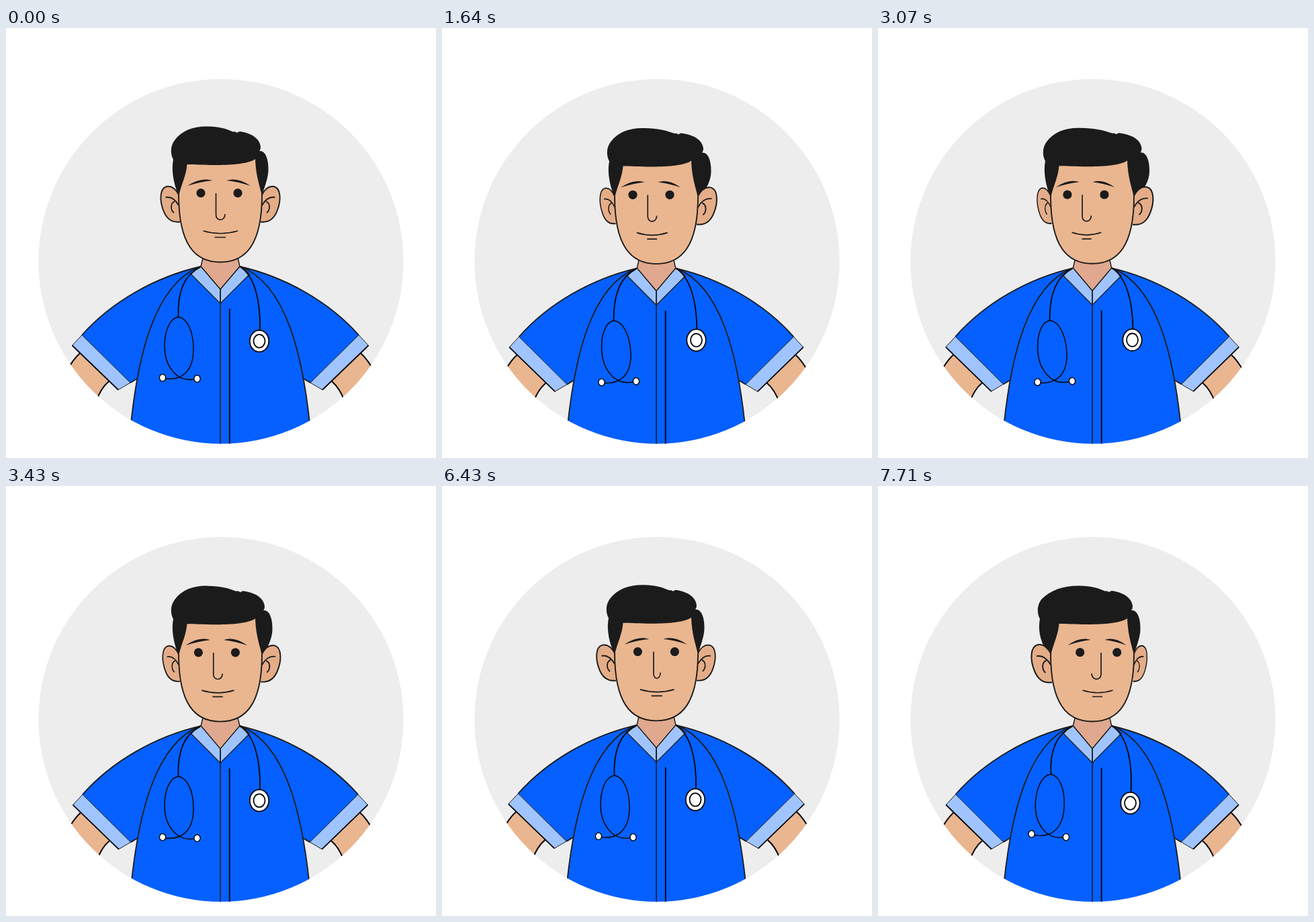
An HTML page with a canvas that plays this animation: 640x640 px, repeating every 8 s.

```html
<!DOCTYPE html>
<html lang="en">
<head>
<meta charset="utf-8">
<title>Doctor</title>
<style>
  html, body { margin: 0; width: 100%; height: 100%; overflow: hidden; background: #fff; }
  canvas { display: block; }
</style>
</head>
<body>
<canvas id="stage" width="640" height="640"></canvas>
<script>
const ctx = document.getElementById('stage').getContext('2d');
const INK = '#1b1b1b', BLACK = '#050508', BLUE = '#0560ff', PALE = '#a0c4ff';
const SKIN = '#eab690', EAR = '#e4ad88', NECK = '#e0a88e';
const LOOP = 8000, FPS = 14;
const BLINKS = [28, 62, 105], LIDS = [0.55, 0.12, 0.55];

const ramp = (k, from, to) => Math.min(1, Math.max(0, (k - from) / (to - from)));

function shape(d, fill, width, color = INK) {
  const path = new Path2D(d);
  if (fill) { ctx.fillStyle = fill; ctx.fill(path); }
  if (width) { ctx.strokeStyle = color; ctx.lineWidth = width; ctx.stroke(path); }
}

function oval(x, y, rx, ry, fill, width) {
  ctx.beginPath();
  ctx.ellipse(x, y, rx, ry, 0, 0, 7);
  ctx.fillStyle = fill;
  ctx.fill();
  if (width) { ctx.strokeStyle = BLACK; ctx.lineWidth = width; ctx.stroke(); }
}

function group(draw) {
  ctx.save();
  draw();
  ctx.restore();
}

// Draws the left half, then its mirror image about x = 319.
function bothSides(draw) {
  group(() => draw(0));
  group(() => { ctx.translate(638, 0); ctx.scale(-1, 1); draw(1); });
}

function body() {
  bothSides(() => {
    shape('M110 484 Q100 493 90 511 L110 580 L134 556 Q141 536 153 526Z', SKIN);
    shape('M110 484 Q100 493 90 511 M153 526 Q141 536 134 556', null, 2, BLACK);
    shape('M290 355 C222 370.5 157 407.5 113 457 L185 528 L196 521.5Z', BLUE);
    shape('M113 457 L98.5 472.5 L167 538.5 L185 528Z', PALE, 1);
    shape('M290 355 C222 370.5 157 407.5 113 457 M185 528 L196 521.5', null, 1.8);
    shape('M98.5 472.5 L167 538.5', null, 1.8, BLACK);
  });
  bothSides(() => {
    shape('M289 355 C220 382 196.5 490 186 588 V640 H319.5 V389Z', BLUE);
    shape('M289 355 C220 382 196.5 490 186 588', null, 1.8);
  });
  shape('M294 338 L290 355 L319 389 L348 355 L344 338Z', NECK, 1.5);
  bothSides(() => shape('M290 355 L319 389 V410 L275.5 366.5 Q282 359 290 355Z', PALE, 1.3));
  shape('M319 389 V640', null, 1.5);
  shape('M332.8 418 V640', null, 1.9, BLACK);
}

function stethoscope(swing) {
  shape(`M289 356 C266 367 255 393 ${256.5 - swing} ${430.5 + 3 * swing}`, null, 1.8, BLACK);
  group(() => {
    ctx.translate(256.5, 446 + 3 * swing);
    ctx.rotate(-0.06 * swing);
    ctx.translate(-256.5, -446);
    shape('M256.5 430 C243 432 236 452 236 474 C236 500 252 530 284 522', null, 1.5, BLACK);
    shape('M256.5 430 C270 432 279 452 279 478 C279 510 262 527 233 521', null, 1.5, BLACK);
    oval(233, 520.5, 4.6, 5.2, '#fff', 1.4);
    oval(284.5, 522, 4.6, 5.2, '#fff', 1.4);
  });
  const x = 377 + 1.5 * swing, y = 466 - 4 * swing;
  shape(`M348 355 C369 368 379 403 ${x + 1} ${y - 16}`, null, 1.8, BLACK);
  oval(x, y, 14.2, 16.2, '#fff', 1.8);
  oval(x, y, 8.5, 9.8, '#fff', 1.8);
}

function head(left, right, lid) {
  const at = (x, l, r) => x + left * l + right * r;
  const l = 8 * right, r = 15 * left, tuft = 0.8 * r;

  shape('M257 250 V195 H381 V250Z', SKIN);
  shape(`M${249 - l} 196 C${244 - l} 186 ${245 - l} 175 ${251 - l} 167
    C${262 - 0.6 * l} 152 ${280 - 0.2 * l} 146 300 146.5
    C${318 + 0.4 * r} 147 ${328 + 0.6 * r} 150 ${338 + tuft} 154.5
    Q${341 + tuft} 153.5 ${344 + tuft} 156 Q${347 + tuft} 153 ${351 + tuft} 154.5
    C${366 + r} 157 ${378 + r} 165 ${379 + r} 177 Q${379 + r} 181 ${377 + r} 183
    C${386 + r} 182 ${391 + r} 195 ${390.5 + r} 212 C${390 + r} 225 ${384 + r} 238 381 250
    C378 235 372 222 371 195 C360 203 330 204 311 204 C295 204 280 203 269.5 203
    C268 220 262 230 257 250 C${252 - l} 238 ${245 - l} 215 ${249 - l} 196Z`, INK);

  bothSides(side => {
    const [away, near] = side ? [right, left] : [left, right];
    ctx.translate(257, 262);
    ctx.scale(1 - 0.27 * away + 0.075 * near, 1 + 0.07 * near);
    ctx.translate(-257, -262);
    shape('M257.5 249 C252 238 245 235 239 236 C228 239 229 258 234 271 C239 285 247 290 259 288.5', EAR, 1.9);
    shape('M237.5 252 Q249 250 257 264 M251 258 C244 261 245 271 250 275', null, 1.8);
  });

  shape('M257 248 C257 322 281 348.5 319 348.5 S381 322 381 248', SKIN, 1.9);

  const brow = (tail, tip) => {
    const along = t => tail + (tip - tail) * t;
    shape(`M${tail} 235 C${along(0.33)} 227 ${along(0.67)} 223 ${tip} 227
      Q${along(0.5)} 229 ${tail} 235Z`, INK);
  };
  brow(at(270, -6, 12.5), at(307, -8.5, 9.5));
  brow(at(364, -13, 5.5), at(328.5, -10, 9));

  for (const x of [290, 345]) oval(at(x, -9, 10.7), 245.7, 6.6, 6.6 * lid, INK);

  const nose = at(312.5, -9.4, 19.5), tip = at(326, -9.6, -8);
  shape(`M${nose} 246 V278 C${nose} 288 ${tip} 288 ${tip} 277`, null, 1.7);

  const mouthA = at(293.5, -5.5, 11), mouthB = at(345, -14, 4.5);
  shape(`M${mouthA} 302 Q${(mouthA + mouthB) / 2} 309.5 ${mouthB} 302`, null, 1.7);
  shape(`M${at(310.5, -7.8, 8.5)} 311.5 H${at(327, -10.5, 7)}`, null, 1.7);
}

function render(now) {
  const k = Math.floor((now % LOOP + 4) * FPS / 1000) % (LOOP * FPS / 1000);
  const left = ramp(k, 15, 27) - ramp(k, 42, 52);
  const right = ramp(k, 89, 97);
  const swing = ramp(k, 15, 22) - ramp(k, 43, 48) - ramp(k, 90, 97);
  const turn = left + right;
  const dip = 2 * turn + 5.6 * turn * (1 - turn);
  const blink = BLINKS.find(b => k >= b && k < b + LIDS.length);
  const lid = blink === undefined ? 1 : LIDS[k - blink];

  ctx.clearRect(0, 0, 640, 640);
  oval(320, 347.3, 271.6, 271.4, '#ededed');
  group(() => {
    ctx.clip();
    ctx.translate(0, dip);
    group(() => {
      ctx.translate(319, 0);
      ctx.scale(1 - 0.012 * turn, 1);
      ctx.translate(-319, 0);
      body();
    });
    stethoscope(swing);
    head(left, right, lid);
  });
}

const start = performance.now();
function tick() {
  render(performance.now() - start);
  requestAnimationFrame(tick);
}
tick();
</script>
</body>
</html>
```
